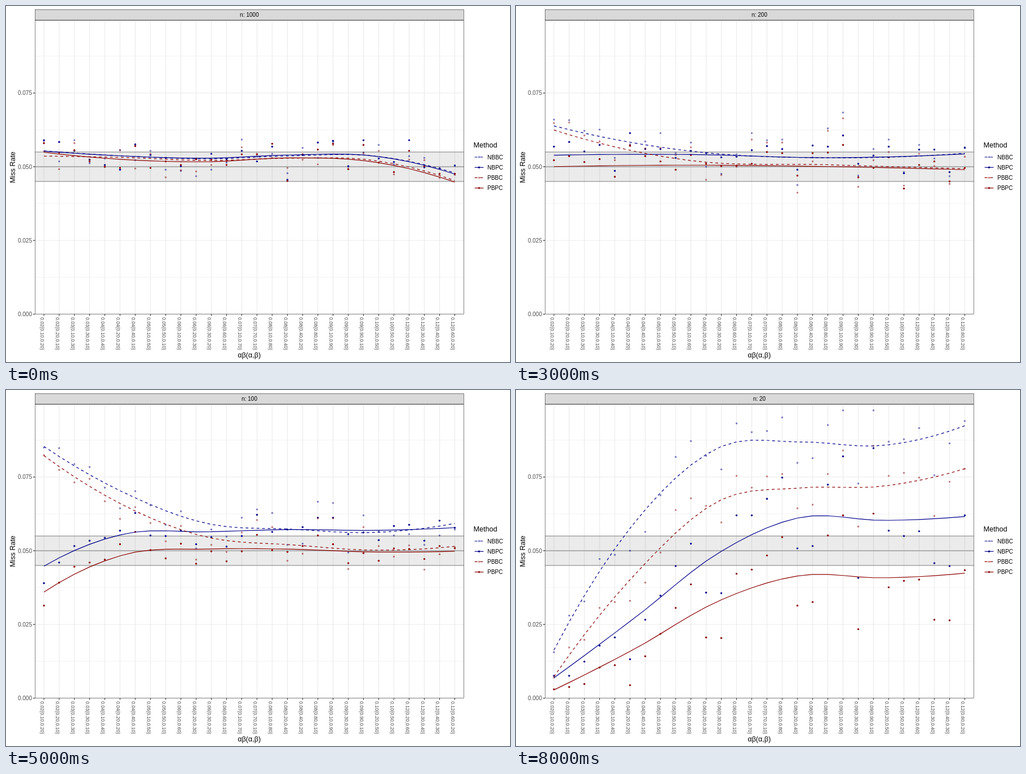
Animation, 890 px wide and 629 px high, one loop 9000 ms. Source, as an HTML page:

```html
<!DOCTYPE html>
<html lang="en">
<head>
<meta charset="utf-8">
<style>
html, body { margin: 0; width: 100%; height: 100%; overflow: hidden; background: #fff; }
svg { display: block; font: 10.02px "Liberation Sans", Arial, sans-serif; }
.title { font-size: 12.53px; }
.label { font-size: 8.55px; }
.axis { fill: #4d4d4d; }
.mid { text-anchor: middle; }
.end { text-anchor: end; }
</style>
</head>
<body>
<svg width="890" height="629" viewBox="0 0 890 629">
  <g id="back"></g>
  <g id="plot"></g>
  <g id="front"></g>
</svg>
<script>
const BLUE = '#00008b', RED = '#8b0000';
const METHODS = [
  { name: 'NBBC', color: BLUE, soft: true },
  { name: 'NBPC', color: BLUE },
  { name: 'PBBC', color: RED, soft: true },
  { name: 'PBPC', color: RED },
];
const LEFT = 51, RIGHT = 808.6, STRIP = 6.2, TOP = 25.2, BASE = 544.5;

// Every pair of tenths a, b whose product is at most 0.12.
const COLS = [];
for (let p = 2; p <= 12; p++) for (let a = 1; a <= 9; a++) {
  const b = p / a;
  if (b % 1 === 0 && b <= 9) COLS.push({ p, a, b });
}
const LAST = COLS.length - 1;

// Rates are held in units of 0.0001.
const colX = i => 67 + i * 26.87;
const rateY = v => BASE - v * 0.521;

const line = (x1, y1, x2, y2, color, width) =>
  `<path d="M${x1} ${y1}L${x2} ${y2}" stroke="${color}" stroke-width="${width}"/>`;
const text = (x, y, str, cls = '', angle = 0) =>
  `<text class="${cls}" transform="translate(${x} ${y}) rotate(${angle})">${str}</text>`;
const rect = (y1, y2, fill) =>
  `<rect x="${LEFT}" y="${y1}" width="${RIGHT - LEFT}" height="${y2 - y1}" fill="${fill}"/>`;
const border = (y1, y2) =>
  `<rect x="${LEFT + 0.3}" y="${y1 + 0.3}" width="${RIGHT - LEFT - 0.6}" height="${y2 - y1 - 0.6}" fill="none" stroke="#333" stroke-width="0.6"/>`;
const dot = (x, y, m) =>
  `<circle cx="${x}" cy="${y}" r="1.7" fill="${m.color}" opacity="${m.soft ? 0.5 : 1}"/>`;
const stroke = (points, m) =>
  `<polyline points="${points.join(' ')}" fill="none" stroke="${m.color}" stroke-width="1.2"${m.soft ? ' stroke-dasharray="4.86"' : ''}/>`;

// keys: evenly spaced trend points, one row per method.
// pull: how strongly unequal a and b raise the rate, for dashed and solid methods.
const PANELS = [
  { n: 1000, pull: [60, 40], keys: [
    [554, 536, 527, 537, 537, 479], [553, 536, 529, 540, 537, 475],
    [536, 531, 521, 529, 522, 453], [549, 524, 517, 530, 517, 448]] },
  { n: 250, pull: [160, 50], keys: [
    [579, 534, 522, 547], [523, 530, 518, 547],
    [572, 509, 508, 497], [507, 504, 497, 496]] },
  { n: 150, pull: [200, 30], keys: [
    [715, 577, 541, 544], [560, 556, 547, 539],
    [692, 536, 505, 488], [492, 507, 505, 482]] },
  { n: 75, pull: [160, 100], keys: [
    [952, 746, 612, 594, 579, 627], [368, 558, 571, 588, 587, 606],
    [915, 697, 562, 529, 506, 534], [266, 478, 504, 504, 494, 510]] },
  { n: 50, pull: [60, 170], keys: [
    [720, 831, 746, 661, 618, 620], [181, 516, 615, 616, 607, 586],
    [561, 744, 665, 574, 530, 510], [100, 400, 515, 520, 507, 470]] },
  { n: 20, pull: [220, 450], keys: [
    [163, 602, 849, 869, 857, 924], [69, 276, 492, 613, 603, 616],
    [73, 424, 668, 713, 719, 778], [28, 170, 329, 416, 408, 424]] },
];

// Catmull-Rom through the keys, with the ends extended by a parabola.
function curveAt(keys, col) {
  const ext = (a, b, c) => 3 * a - 3 * b + c;
  const k = [ext(...keys), ...keys, ext(...keys.slice(-3).reverse())];
  const pos = col / LAST * (keys.length - 1);
  const i = Math.min(Math.floor(pos), keys.length - 2), t = pos - i;
  const [a, b, c, d] = k.slice(i, i + 4);
  return (2 * b + (c - a) * t + (2 * a - 5 * b + 4 * c - d) * t * t
    + (3 * b - a - 3 * c + d) * t ** 3) / 2;
}

const lerp = (a, b, w) => a + (b - a) * w;

// A panel for size n, placed between two known panels on a log scale.
function makePanel(n) {
  const hi = PANELS.findLast(p => p.n >= n), lo = PANELS.find(p => p.n <= n);
  const w = hi === lo ? 0 : Math.log(hi.n / n) / Math.log(hi.n / lo.n);
  return {
    n,
    pull: hi.pull.map((v, i) => lerp(v, lo.pull[i], w)),
    trends: METHODS.map((_, i) => COLS.map((_, c) =>
      lerp(curveAt(hi.keys[i], c), curveAt(lo.keys[i], c), w))),
  };
}

function seeded(s) {
  return () => {
    s = s + 0x6d2b79f5 | 0;
    let t = Math.imul(s ^ s >>> 15, 1 | s);
    t = t + Math.imul(t ^ t >>> 7, 61 | t) ^ t;
    return ((t ^ t >>> 14) >>> 0) / 2 ** 32;
  };
}

function drawPanel(n) {
  const { pull, trends } = makePanel(n);
  const random = seeded(n);
  const bell = () => (random() + random() + random() - 1.5) * 2;
  let out = '';
  COLS.forEach(({ a, b }, c) => {
    const uneven = (Math.abs(a - b) / 10 - 0.37) * Math.min(1, c / 8);
    const shared = bell(), kinds = [bell(), bell()];
    METHODS.forEach((m, i) => {
      const v = trends[i][c], kind = i % 2;
      // Binomial spread of 5000 trials, mostly common to the column.
      const noise = Math.sqrt(2 * v) * (0.75 * shared + 0.55 * kinds[kind] + 0.3 * bell());
      const rate = Math.min(975, Math.max(30, v + pull[kind] * uneven + noise));
      out += dot(colX(c), rateY(2 * Math.round(rate / 2)), m);
    });
  });
  METHODS.forEach((m, i) => {
    out += stroke(trends[i].map((v, c) => [colX(c), rateY(v)]), m);
  });
  return out + text(429.8, 19.3, 'n: ' + n, 'mid');
}

function drawBack() {
  const across = (v, color, width) => line(LEFT, rateY(v), RIGHT, rateY(v), color, width);
  let out = rect(STRIP, TOP, '#d9d9d9');
  for (let v = 125; v < 1000; v += 250) out += across(v, '#ebebeb', 0.6);
  for (let v = 0; v < 1000; v += 250) {
    out += across(v, '#ebebeb', 1.2);
    out += line(LEFT - 3.1, rateY(v), LEFT, rateY(v), '#333', 1.2);
    out += text(46, rateY(v) + 3.6, (v / 1e4).toFixed(3), 'axis end');
  }
  COLS.forEach(({ p, a, b }, c) => {
    const x = colX(c);
    out += line(x, TOP, x, BASE, '#ebebeb', 1.2) + line(x, BASE, x, BASE + 3.1, '#333', 1.2);
    out += text(x - 6.2, 550, `${(p / 100).toFixed(2)}(${(a / 10).toFixed(2)},${(b / 10).toFixed(2)})`, 'axis label', 90);
  });
  out += rect(rateY(550), rateY(450), 'rgba(0,0,0,.08)');
  for (const v of [450, 500, 550]) out += across(v, '#7c7c7c', 1.1);
  return out;
}

function drawFront() {
  let out = border(STRIP, TOP) + border(TOP, BASE);
  out += text(429.5, 620.5, 'αβ(α,β)', 'title mid') + text(16, 285, 'Miss Rate', 'title mid', -90);
  out += text(825.6, 250, 'Method', 'title');
  METHODS.forEach((m, i) => {
    const y = 267 + i * 18.2;
    out += dot(835.4, y, m) + stroke([[827.6, y], [843.3, y]], m) + text(850, y + 3.6, m.name);
  });
  return out;
}

const el = id => document.getElementById(id);
el('back').innerHTML = drawBack();
el('front').innerHTML = drawFront();

const views = [1000, 500, 250, 200, 150, 100, 75, 50, 20].map(drawPanel);
let shown = -1;
function tick() {
  const i = Math.floor(performance.now() / 1000) % views.length;
  if (i !== shown) el('plot').innerHTML = views[shown = i];
  requestAnimationFrame(tick);
}
tick();
</script>
</body>
</html>
```
